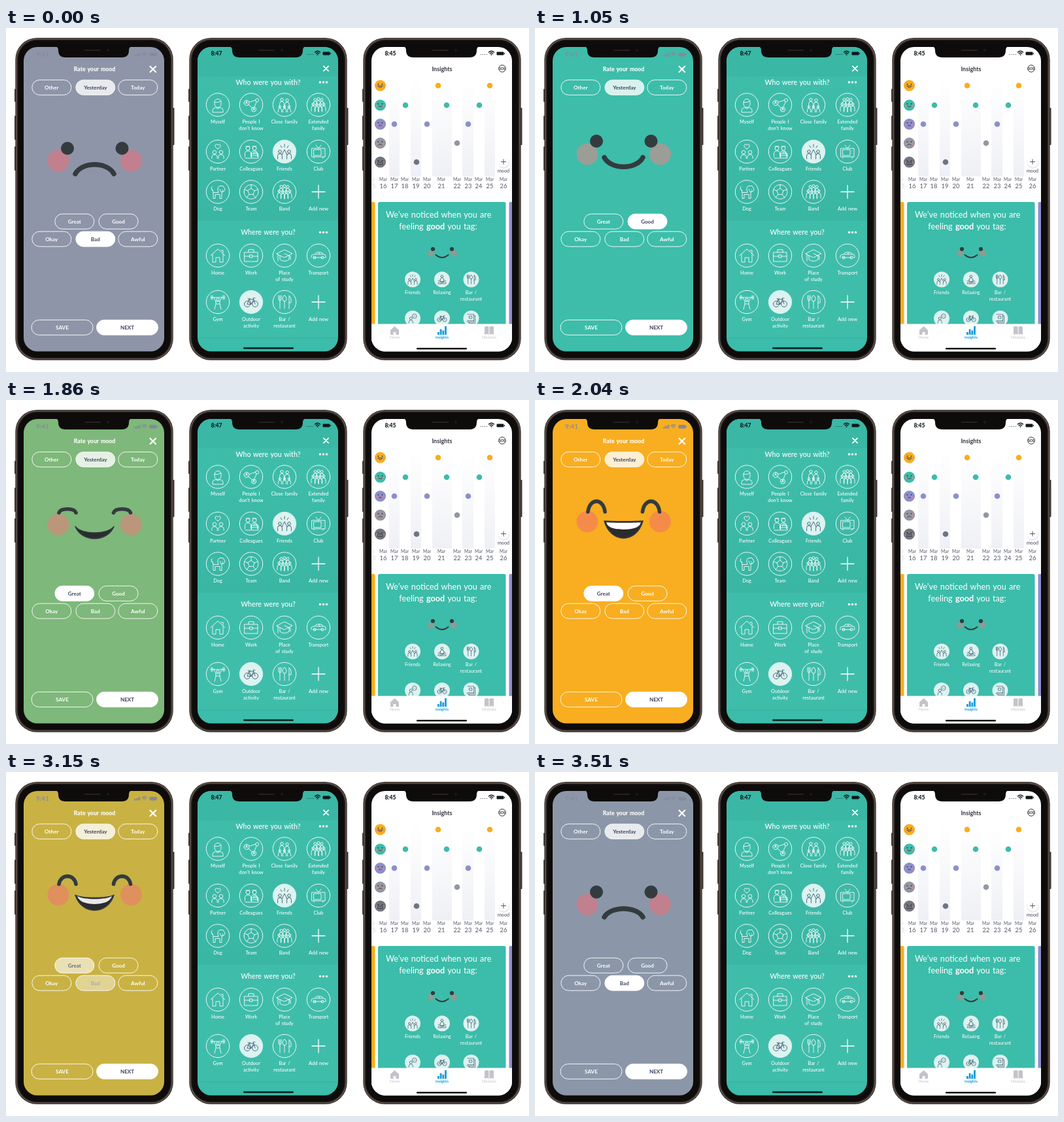
Recreate the animation shown at these times as an HTML page. Size 800 by 526 pixels, loop 3.54 s.

```html
<!DOCTYPE html>
<html lang="en">
<head>
<meta charset="utf-8">
<title>Mood diary</title>
<style>
html, body { margin: 0; width: 100%; height: 100%; overflow: hidden; background: #fff; }
svg { display: block; width: 100%; height: 100%; font-family: Lato, "Open Sans", sans-serif; word-spacing: .06em; }
</style>
</head>
<body>
<svg id="stage" viewBox="0 0 800 526"></svg>
<script>
const TEAL = '#3cbcaa', INK = '#3d4260', PALE = '#dcf3f0';
const stage = document.getElementById('stage');

// ---- drawing helpers ----
const rect = (x, y, w, h, fill, rx = 0, extra = '') =>
  `<rect x="${x}" y="${y}" width="${w}" height="${h}" rx="${rx}" fill="${fill}" ${extra}/>`;
const dot = (x, y, r, fill, extra = '') => `<circle cx="${x}" cy="${y}" r="${r}" fill="${fill}" ${extra}/>`;
const line = (d, color, width = 1, extra = '') =>
  `<path d="${d}" fill="none" stroke="${color}" stroke-width="${width}" stroke-linecap="round" stroke-linejoin="round" ${extra}/>`;
const shape = (d, fill, extra = '') => `<path d="${d}" fill="${fill}" ${extra}/>`;
const text = (x, y, size, str, fill = '#fff', weight = 400, extra = '') =>
  `<text x="${x}" y="${y}" font-size="${size}" fill="${fill}" font-weight="${weight}" text-anchor="middle" ${extra}>${str}</text>`;
const at = (x, y, inner, scale = 1) => `<g transform="translate(${x} ${y}) scale(${scale})">${inner}</g>`;
const cross = (x, y, r, w) => line(`M${x - r} ${y - r}l${2 * r} ${2 * r}m0 ${-2 * r}l${-2 * r} ${2 * r}`, '#fff', w);
const plus = (x, y, r, color, w) => line(`M${x - r} ${y}h${2 * r}M${x} ${y - r}v${2 * r}`, color, w);
const ring = (x, y, r) => `M${x - r} ${y}a${r} ${r} 0 1 0 ${2 * r} 0a${r} ${r} 0 1 0 ${-2 * r} 0`;
const person = (x, y, s, legs = 2) =>
  ring(x, y, s) + `M${x - s * 1.5} ${y + s * (2.8 + legs)}v${-s * legs}q0 ${-s * 1.5} ${s * 1.5} ${-s * 1.5}t${s * 1.5} ${s * 1.5}v${s * legs}`;

// ---- line icons, centred on the origin ----
const icons = {
  myself: 'M-5-4a5 5 0 0 1 10 0v3a5 5 0 0 1-10 0zM-5-4q6 1 10-2M-8 11v-3q0-3 5-4l3 2 3-2q5 1 5 4v3z',
  network: ring(-7, -3, 4) + ring(4, 7, 3.6) + ring(9, -7, 2.5) + person(-7, -4.5, 1, 0) + person(4, 5.5, 1, 0) +
    'M-3-4l9-3M-4 0l5 4M5 3l3-7',
  family: person(-4, -8, 2.2, 3) + person(4, -7, 2.2, 3) + person(-7, 3, 1.7) + person(0, 3, 1.7) + person(7, 3, 1.7),
  crowd: person(-5, -8, 2, 2) + person(0, -9, 2, 2) + person(5, -8, 2, 2) +
    person(-8, -1, 2, 2.5) + person(-2.7, 0, 2, 2.5) + person(2.7, 0, 2, 2.5) + person(8, -1, 2, 2.5),
  partner: person(-5, 1, 2.8, .6) + person(5, 1, 2.8, .6) + 'M0-4q-5-3-4-6t4 0q3-3 4 0t-4 6',
  colleagues: person(-5, -5, 3, 1.5) + person(5, -5, 3, 1.5) + 'M-8-8h6M2-8h6M1 3h10v7h-10zM4 3v-2h4v2M1 6h10M-9 10h9',
  friends: person(-7, 0, 2.3, 2) + person(7, 0, 2.3, 2) + 'M-4 5l4-8 4 8M0-7v-4M-4-6l-2-3M4-6l2-3',
  tv: 'M-10-5h20v13h-20zM-7-3h11v9h-11zM-4-10l4 5 4-5M7-1v0M7 3v0M-7 8v2M7 8v2',
  dog: 'M-9-8q-2 4 1 5l1 4v9h3v-6h7v6h3v-9l2-3M-7 1h8q-3-8 2-10h5l3 5q-1 5-6 4l-2-4M7-3v0M-7-2l-3-2',
  ball: ring(0, 0, 11) + 'M0-5l5 3.500-2 5.500h-6l-2-5.500zM0-5v-6M5-1.500l5-2M3 4l4 5M-3 4l-4 5M-5-1.500l-5-2',
  house: 'M-11 0l11-10 11 10M-8-2v12h5v-7h6v7h5v-12M5-8h3v4',
  bag: 'M-10-5h20v14h-20zM-4-5v-4h8v4M-10 1h8M2 1h8M-2-1h4v4h-4z',
  study: 'M-12-3l12-6 12 6-12 6zM-7 0v6q7 5 14 0v-6M-10-2v10M0-3l9 4v5',
  car: 'M-11 3v-3q2-2 5-2l3-3h7l4 3q3 0 3 3v2h-2M-8 3h14M-5-2h12M1-5v3' + ring(-6, 3, 2) + ring(6, 3, 2),
  gym: 'M-11-7h22M-10-10v6M-8-10v6M10-10v6M8-10v6M-6-7l3 6h6l3-6M-3-1v4h6v-4M-3 3l-2 8M3 3l2 8' + ring(0, -4, 2),
  bike: ring(-6, 3, 4.5) + ring(6, 3, 4.5) + 'M-6 3l3-7h7l-4 7zM-3-4l3 7M6 3l-3-9h3M-5-5h4',
  cutlery: 'M-9-10v5q0 3 2 3t2-3v-5M-7-10v20M0-10q-3 1-3 5t3 4 3-4-3-5M0-1v11M7 10v-20q4 4 3 11h-3',
  relax: ring(0, -7, 2.7) + 'M0-4q-4 1-4 5l-5 3M0-4q4 1 4 5l5 3M-4 1v4h8v-4M-9 9q0-4 9-4t9 4zM-4 9l8-3',
  talk: person(-4, 0, 3, .8) + ring(4, -5, 5) + 'M2-5v0M4-5v0M6-5v0',
  book: 'M-8-9h14v17h-14q-2-1 0-3h14M-4-5h6v5h-6zM6-6h3v17h-14v-3'
};
const icon = (name, color, width = .85) => line(icons[name], color, width);

// ---- phone shell ----
function phone(x, screen) {
  const buttons = [[-1, 93, 20], [-1, 134, 37], [-1, 181, 37], [241, 122, 57]]
    .map(([bx, y, h]) => rect(bx, y, 2.5, h, '#423833', 1)).join('');
  const notch = 'M60 28q6 0 6 6q0 11 11 11h86q11 0 11-11q0-6 6-6z';
  return `<g transform="translate(${x} 0)">${buttons}
    ${rect(.3, 15, 241.4, 493, '#3b322e', 33)}${rect(1.6, 16.3, 238.8, 490.4, '#6a5d56', 32)}
    ${rect(2.8, 17.5, 236.4, 488, '#292220', 31)}${rect(4.5, 19, 233, 485, '#0e0b0b', 29)}
    <g clip-path="url(#screen)">${screen}</g>${shape(notch, '#0e0b0b')}
    ${rect(106, 33, 25, 2, '#25211f', 1)}${dot(142, 34, 2, '#171a2b')}</g>`;
}
const wifi = (x, y, color, s = 1) =>
  at(x, y, line('M-4-3q4-3.500 8 0M-2.300-1q2.300-2 4.600 0', color, 1.4) + dot(0, .8, 1, color), s);
const status = time => text(42, 41.5, 8.6, time, '#10181a', 800) +
  [181, 184, 187, 190].map(x => dot(x - .5, 40.5, .6, '#10181a')).join('') +
  wifi(196.5, 40, '#10181a') + rect(204.5, 36.5, 11, 5, '#10181a', 1.3) + rect(216, 38, 1, 2, '#10181a');

// ---- phone 2: tags ----
const columns = [44, 95, 146, 198];
function tagRow(y, tags) {
  return tags.map(([name, label, on], i) => {
    const x = columns[i];
    const picture = name === 'add'
      ? plus(x, y, 10, '#fff', 1.3)
      : dot(x, y, 17.7, on ? PALE : 'none', `stroke="${on ? PALE : '#fff'}" stroke-width=".9"`) +
        at(x, y, icon(name, on ? '#36506b' : '#fff'));
    return picture + label.split('|').map((s, n) => text(x, y + 28.5 + n * 10, 7.4, s, '#fff', 500)).join('');
  }).join('');
}
const heading = (y, str) => text(121, y, 10.6, str, '#fff', 500) +
  [200.5, 205.5, 210.5].map(x => dot(x, y - 3.5, 1.7, '#fff')).join('');
const tagScreen = rect(13, 29, 216, 466, TEAL) + rect(13, 29, 216, 45, '#3ab7a5') +
  rect(13, 74, 216, 221, 'url(#panel)') + rect(13, 295, 216, 179, '#3fbdab') + rect(13, 473, 216, 2, '#39b5a3') +
  status('8:47') + cross(209.5, 62, 3.7, 1.7) + heading(86.5, 'Who were you with?') +
  tagRow(117.5, [['myself', 'Myself'], ['network', 'People I|don\'t know'], ['family', 'Close family'], ['crowd', 'Extended|family']]) +
  tagRow(189, [['partner', 'Partner'], ['colleagues', 'Colleagues'], ['friends', 'Friends', 1], ['tv', 'Club']]) +
  tagRow(250.5, [['dog', 'Dog'], ['ball', 'Team'], ['crowd', 'Band'], ['add', 'Add new']]) +
  heading(316, 'Where were you?') +
  tagRow(348, [['house', 'Home'], ['bag', 'Work'], ['study', 'Place|of study'], ['car', 'Transport']]) +
  tagRow(419, [['gym', 'Gym'], ['bike', 'Outdoor|activity', 1], ['cutlery', 'Bar /|restaurant'], ['add', 'Add new']]) +
  rect(83, 488.3, 77, 2.6, '#0d2d29', 1.3);

// ---- phone 3: insights ----
const levels = [
  { y: 88, color: '#f8ae1e', days: [115, 194], mouth: 'M-3 1q3 5 6 0z' },
  { y: 118, color: TEAL, days: [65, 128, 178], mouth: 'M-3 1q3 3 6 0' },
  { y: 147, color: '#8d8fcc', days: [48, 98, 161], mouth: 'M-2 2h4' },
  { y: 176, color: '#9397a3', days: [144], mouth: 'M-3 3q3-3 6 0' },
  { y: 205, color: '#70757f', days: [82], mouth: 'M-4 3v-3h8v3z' }
];
const days = [[31, 16], [48, 17], [64, 18], [81, 19], [98, 20], [120, 21], [144, 22], [161, 23], [177, 24], [194, 25], [215, 26]];
const chart = [[40, 16], [73, 16], [106, 30], [152, 17], [186, 16]].map(([x, w]) => rect(x, 78, w, 149, 'url(#stripe)')).join('') +
  levels.map(({ y, color, days, mouth }) =>
    at(26.5, y, dot(0, 0, 8.6, color) + dot(-4.5, 1, 2, '#e3878a', 'opacity=".7"') + dot(4.5, 1, 2, '#e3878a', 'opacity=".7"') +
      dot(-3, -2, .9, '#333b3f') + dot(3, -2, .9, '#333b3f') + line(mouth, '#333b3f', .9)) +
    days.map(x => dot(x, y, 4.3, color)).join('')).join('') +
  days.map(([x, n]) => text(x, 233.5, 6.7, 'Mar', '#555766') + text(x, 245.3, 9.4, n, '#555766')).join('') +
  text(17, 233.5, 6.7, 'r', '#ddd') + text(17, 245.3, 9.4, '5', '#ddd');
const cardTags = [['friends', 'Friends', 76], ['relax', 'Relaxing', 121], ['cutlery', 'Bar /|restaurant', 165.5]];
const cardIcon = (name, x, y) => dot(x, y, 12, PALE) + at(x, y, icon(name, '#36506b', 1), .68);
const card = rect(12, 266, 6.5, 190, '#f8ae1e', 2) + rect(23, 266, 195.5, 190, TEAL, 3) + rect(223.5, 266, 8, 190, '#8d8fcc', 2) +
  text(115.7, 290, 12.7, 'We’ve noticed when you are') +
  text(115, 308, 12.7, 'feeling <tspan font-weight="700">good</tspan> you tag:') +
  dot(104, 344.5, 5, '#8b9d95') + dot(139, 344.5, 5, '#8b9d95') + dot(107, 338, 3.1, '#333b3f') + dot(136, 338, 3.1, '#333b3f') +
  line('M111.500 347q9.500 8 19 0', '#333b3f', 2.1) +
  cardTags.map(([name, label, x]) => cardIcon(name, x, 384.5) +
    label.split('|').map((s, n) => text(x, 407 + n * 9.7, 7.5, s)).join('')).join('') +
  cardIcon('talk', 76, 444) + cardIcon('bike', 121, 444) + cardIcon('book', 165.5, 444);
const tabs = rect(13, 452.5, 216, 43, '#fff') +
  shape('M42 462l6.500-6 6.500 6v7h-4.500v-4h-4v4H42z', '#c3c4c9') + text(48.5, 475, 5.8, 'Home', '#c3c4c9') +
  [[114, 465], [117.7, 460.5], [121.4, 462.5], [125.1, 456]].map(([x, y]) => rect(x, y, 2.8, 469 - y, '#159be0')).join('') +
  text(121, 475, 5.8, 'Insights', '#159be0', 700) +
  shape('M186 457q4-2 6.500 0v12q-3-2-6.500 0zM193.500 457q3-2 6.500 0v12q-3-2-6.500 0z', '#c3c4c9') + text(193, 475, 5.8, 'Modules', '#c3c4c9') +
  rect(82, 489, 77, 2.6, '#111', 1.3);
const insightScreen = rect(13, 29, 216, 466, '#fff') + status('8:45') + text(121, 65.5, 9, 'Insights', '#33343f', 700) +
  dot(213, 62, 5.3, '#fff', 'stroke="#222" stroke-width=".9"') + text(213, 64, 5, 'SOS', '#222', 700) + chart +
  dot(215.5, 206, 9, '#e3e4ea', 'opacity=".7"') + dot(215, 204.5, 8, '#fff') + plus(215, 204.5, 3.6, '#555766', 1) +
  text(215, 220.5, 7.2, 'mood', '#44465a') + card + tabs;

// ---- phone 1: mood picker ----
const pill = (x, y, label, w = 60, fill = 'none', color = '#fff', id = '', opacity = 1) =>
  rect(x, y, w, 23, fill, 11.5, `fill-opacity="${opacity}" stroke="#fff" stroke-width=".9" stroke-opacity="${opacity}" ${id && `id="${id}Pill"`}`) +
  text(x + w / 2, y + 14.5, 8.1, label, color, 700, id && `id="${id}Text"`);
const grey = '#868a9b';
const moodScreen = `<rect id="back" x="13" y="29" width="216" height="466"/>` +
  text(42, 43.5, 10, '9:41', grey, 600) +
  [0, 1, 2, 3].map(i => rect(181.5 + i * 2.6, 41.5 - i * 1.2, 1.9, 2 + i * 1.2, grey)).join('') +
  wifi(197.5, 42, grey, .9) + rect(205.5, 38, 11, 5.5, grey, 1.3) + rect(217, 39.7, 1, 2, grey) +
  text(121.5, 66.3, 8.7, 'Rate your mood', '#fff', 800) + cross(210.8, 63, 4.3, 2.2) +
  pill(25.8, 79.4, 'Other') + pill(92.8, 79.4, 'Yesterday', 60, '#fff', INK, '', .8) + pill(157.8, 79.4, 'Today') +
  '<circle id="cheekL" cx="66" r="16.5"/><circle id="cheekR" cx="177.5" r="16.5"/>' +
  line('', '#333b3f', 1, 'id="eyeL"') + line('', '#333b3f', 1, 'id="eyeR"') +
  '<path id="mouth" fill="#2b2b2e" stroke="#333b3f" stroke-linecap="round" stroke-linejoin="round"/><path id="teeth" fill="#fff"/>' +
  pill(60.8, 284.3, 'Great', 60, '#fff', INK, 'great') + pill(128, 284.3, 'Good', 60, '#fff', INK, 'good') +
  pill(25.8, 311.2, 'Okay') + pill(92.8, 311.2, 'Bad', 60, '#fff', INK, 'bad') + pill(157.8, 311.2, 'Awful') +
  pill(25, 446.4, 'SAVE', 94) + pill(124.5, 446.4, 'NEXT', 94, '#fff', INK);

stage.innerHTML = `<defs>
  <clipPath id="screen"><rect x="13" y="29" width="215" height="465.5" rx="21"/></clipPath>
  <linearGradient id="panel" x2="0" y2="1"><stop stop-color="#3fbdab"/><stop offset="1" stop-color="#39b6a4"/></linearGradient>
  <linearGradient id="stripe" x2="0" y2="1"><stop stop-color="#f1f2f6" stop-opacity="0"/><stop offset="1" stop-color="#eff0f5"/></linearGradient>
  </defs>` + phone(14, moodScreen) + phone(280, tagScreen) + phone(546, insightScreen);

// ---- motion ----
const LOOP = 3540, STEP = 30;
const moods = [ // bad, good, great
  { back: [143, 149, 168], cheek: [194, 127, 142], cheekY: 203, eyeY: 184, arch: 184, lipY: 223, upper: 204, lower: 204 },
  { back: [61, 189, 170], cheek: [155, 158, 150], cheekY: 193, eyeY: 173, arch: 173, lipY: 198, upper: 217, lower: 217 },
  { back: [248, 174, 32], cheek: [245, 139, 73], cheekY: 186, eyeY: 171, arch: 149.5, lipY: 185, upper: 186, lower: 220 }
];
const ramp = (t, from, to) => Math.min(1, Math.max(0, (t - from) / (to - from)));
const lerp = (a, b, k) => a + (b - a) * k;
const wave = k => .5 - .5 * Math.cos(Math.PI * k);
const rgb = (a, b, k) => `rgb(${a.map((v, i) => Math.round(lerp(v, b[i], k)))})`;
const set = (id, attrs) => {
  const el = document.getElementById(id);
  for (const name in attrs) el.setAttribute(name, attrs[name]);
};

function moodAt(t) {
  if (t < 1740) return wave(ramp(t, 720, 1050));
  if (t < 3060) return 1 + wave(ramp(t, 1740, 2040));
  if (t < 3240) return 2 - ramp(t, 3060, 3240) ** 2;
  return (1 - ramp(t, 3240, 3585)) ** 2;
}

function select(id, amount) {
  set(id + 'Pill', { 'fill-opacity': amount });
  set(id + 'Text', { fill: rgb([255, 255, 255], [61, 66, 96], ramp(amount, .2, .7)) });
}

function draw(t) {
  const mood = moodAt(t), base = mood >= 1 ? 1 : 0, k = mood - base;
  const from = moods[base], to = moods[base + 1] || from;
  const mix = key => lerp(from[key], to[key], k);
  const open = Math.max(0, mood - 1);

  set('back', { fill: rgb(from.back, to.back, k) });
  for (const id of ['cheekL', 'cheekR']) set(id, { cy: mix('cheekY'), fill: rgb(from.cheek, to.cheek, k) });

  const spread = ramp(open, 0, .3), half = lerp(.01, 13, spread), eyeY = mix('eyeY'), arch = mix('arch');
  for (const [id, x] of [['eyeL', 80], ['eyeR', 163.5]]) {
    set(id, {
      d: `M${x - half} ${eyeY}C${x - half * .8} ${arch} ${x + half * .8} ${arch} ${x + half} ${eyeY}`,
      'stroke-width': lerp(20, 5.6, spread)
    });
  }

  const lip = mix('lipY'), upper = mix('upper'), lower = mix('lower');
  set('mouth', {
    d: `M92 ${lip}C102 ${upper} 141 ${upper} 151 ${lip}C141 ${lower} 102 ${lower} 92 ${lip}z`,
    'stroke-width': Math.max(1.6, lerp(7.5, 1.6, open * 3))
  });
  const gum = lip + 2 * open, bite = lerp(upper, lower, .4);
  set('teeth', {
    d: `M95 ${gum}C104 ${upper + 2} 139 ${upper + 2} 148 ${gum}Q147 ${gum + 4} 144 ${gum + 6}C136 ${bite} 107 ${bite} 99 ${gum + 6}Q96 ${gum + 4} 95 ${gum}z`,
    opacity: ramp(open, .35, .8)
  });

  const toGood = ramp(t, 720, 840), toGreat = ramp(t, 1740, 1860);
  select('bad', 1 - toGood + ramp(t, 3060, 3270));
  select('good', toGood - toGreat);
  select('great', toGreat - ramp(t, 3060, 3285));
}

function tick() {
  draw(Math.floor(performance.now() % LOOP / STEP) * STEP);
  requestAnimationFrame(tick);
}
tick();
</script>
</body>
</html>
```
